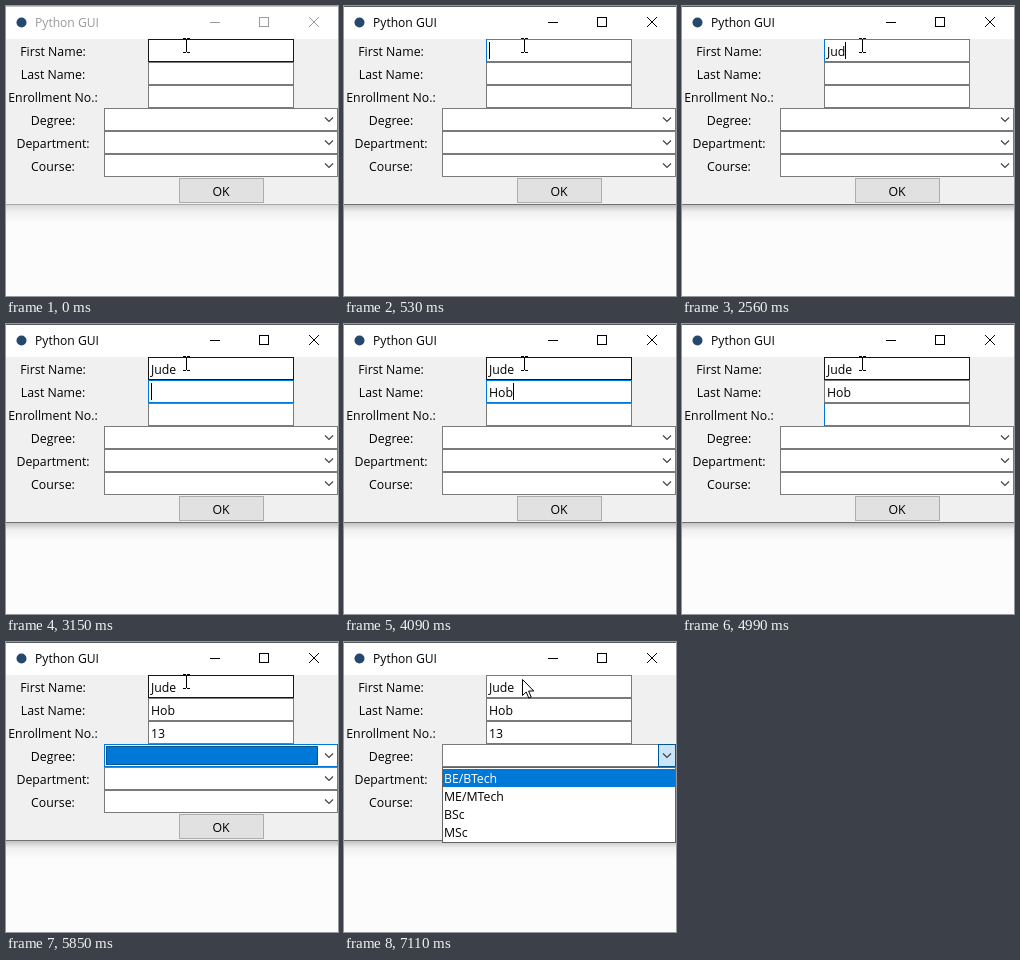
These frames come from a looping animation (332 px wide and 290 px high, 7.99 s). An HTML page with a canvas:

```html
<!DOCTYPE html>
<html lang="en">
<head>
<meta charset="utf-8">
<title>Python GUI</title>
<style>
  html, body { margin: 0; width: 100%; height: 100%; overflow: hidden; background: #fcfcfc; }
  canvas { display: block; }
</style>
</head>
<body>
<canvas id="stage" width="332" height="290"></canvas>
<script>
const ctx = document.getElementById('stage').getContext('2d', { alpha: false });
const LOOP = 7990, ACTIVATE = 530, COMBO_FOCUS = 5850, DROPDOWN = 7110;
const BLUE = '#0078d7', GREY = '#7a7a7a', FONT = '12.3px "Open Sans", "Noto Sans", sans-serif';
const ROW = 23, TOP = 33;
const LABELS = ['First Name:', 'Last Name:', 'Enrollment No.:', 'Degree:', 'Department:', 'Course:'];
const DEGREES = ['BE/BTech', 'ME/MTech', 'BSc', 'MSc'];

// Contents of each entry over time; "|" marks a visible caret.
const TYPING = [
  [[530, '|'], [1090, ''], [1400, '|'], [2050, 'J'], [2110, 'J|'], [2290, 'Ju'], [2350, 'Ju|'],
   [2560, 'Jud|'], [2820, 'Jude'], [2890, 'Jude|'], [3150, 'Jude']],
  [[3150, '|'], [3740, 'H'], [3800, 'H|'], [3900, 'Ho'], [3980, 'Ho|'], [4090, 'Hob|'], [4340, 'Hob']],
  [[4340, '|'], [4990, ''], [5230, '1'], [5300, '1|'], [5470, '13|'], [5850, '13']]
];

function rect(x, y, w, h, fill) {
  ctx.fillStyle = fill;
  ctx.fillRect(x, y, w, h);
}

function box(x, y, w, h, border, fill) {
  rect(x, y, w, h, border);
  rect(x + 1, y + 1, w - 2, h - 2, fill);
}

function text(str, x, y, color = '#000', align = 'left', font = FONT) {
  ctx.font = font;
  ctx.textAlign = align;
  ctx.fillStyle = color;
  ctx.fillText(str, x, y);
}

function line(points, color, width = 1) {
  ctx.beginPath();
  points.forEach(([x, y]) => ctx.lineTo(x, y));
  ctx.strokeStyle = color;
  ctx.lineWidth = width;
  ctx.stroke();
}

function fade(y, h, from, to) {
  const gradient = ctx.createLinearGradient(0, y, 0, y + h);
  gradient.addColorStop(0, from);
  gradient.addColorStop(1, to);
  rect(0, y, 332, h, gradient);
}

function drawWindow(active) {
  const ink = active ? '#000' : '#999';
  rect(0, 0, 332, 290, '#fcfcfc');
  rect(0, 0, 332, 33, '#fff');
  rect(0, 0, 332, 1, active ? '#555a5a' : '#c8c8c8');
  rect(0, TOP, 332, 165, '#f0f0f0');
  rect(0, 198, 332, 1, active ? '#707070' : '#aaa');
  fade(199, 7, active ? '#c2c2c2' : '#dadada', '#f0f0f0');
  fade(206, 11, '#f0f0f0', '#fcfcfc');

  ctx.beginPath();
  ctx.arc(15.5, 16.5, 5, 0, 7);
  ctx.fillStyle = '#24486e';
  ctx.fill();
  text('Python GUI', 29, 21, ink, 'left', FONT.replace('12.3', '12.1'));
  rect(204, 16, 10, 1, ink);
  box(253, 11, 10, 10, ink, '#fff');
  line([[303, 11], [313, 21]], ink);
  line([[313, 11], [303, 21]], ink);
}

function drawEntry(i, t) {
  const y = TOP + i * ROW;
  const steps = TYPING[i];
  const hovered = i === 0 && (t < ACTIVATE || (t >= 3150 && t < DROPDOWN));
  const focused = t >= steps[0][0] && t < steps.at(-1)[0];
  const border = hovered ? '#171717' : focused && i === 1 ? BLUE : GREY;
  box(142, y, 146, ROW, border, '#fff');
  if (focused) rect(142, y, 1, ROW, BLUE);

  const current = steps.findLast(([start]) => t >= start);
  const content = current ? current[1] : '';
  const typed = content.replace('|', '');
  text(typed, 145, y + 17);
  if (content.endsWith('|')) {
    rect(145 + Math.round(ctx.measureText(typed).width), y + 3, 1, 17, '#000');
  }
}

function drawCombo(i, focused, pressed) {
  const y = TOP + i * ROW;
  box(98, y, 234, ROW, focused ? BLUE : GREY, '#fff');
  if (focused) {
    rect(100, y + 2, 212, 19, BLUE);
    ctx.setLineDash([1, 1]);
    ctx.strokeStyle = '#16324a';
    ctx.lineWidth = 1;
    ctx.strokeRect(100.5, y + 2.5, 211, 18);
    ctx.setLineDash([]);
  }
  if (pressed) box(314, y, 18, ROW, '#005499', '#cce4f7');
  line([[319, y + 9.5], [323, y + 13.5], [327, y + 9.5]], '#444', 1.2);
}

function drawDropdown() {
  box(98, 125, 234, 76, '#646464', '#fff');
  rect(99, 127, 232, 18, BLUE);
  DEGREES.forEach((name, i) => text(name, 100, 141 + i * 18, i ? '#000' : '#fff'));
}

function drawIBeam() {
  rect(180, 33, 1, 13, '#000');
  for (const y of [32, 46]) {
    rect(177, y, 3, 1, '#000');
    rect(181, y, 3, 1, '#000');
  }
}

function drawArrow() {
  const arrow = new Path2D('M178.5 37.5v16l3.7-3.5 2.6 6 2.4-1-2.6-6h5.2z');
  ctx.fillStyle = '#fff';
  ctx.fill(arrow);
  ctx.strokeStyle = '#000';
  ctx.lineWidth = 1;
  ctx.stroke(arrow);
}

function draw(t) {
  const open = t >= DROPDOWN;
  drawWindow(t >= ACTIVATE);
  LABELS.forEach((label, i) => {
    text(label, 47, 50 + i * ROW, '#000', 'center');
    if (i < 3) drawEntry(i, t);
    else drawCombo(i, i === 3 && t >= COMBO_FOCUS && !open, i === 3 && open);
  });
  box(173, 172, 85, 25, '#adadad', '#e1e1e1');
  text('OK', 215, 190, '#000', 'center');
  if (open) {
    drawDropdown();
    drawArrow();
  } else {
    drawIBeam();
  }
}

const begin = performance.now();
function tick() {
  draw((performance.now() - begin) % LOOP);
  requestAnimationFrame(tick);
}
tick();
</script>
</body>
</html>
```
